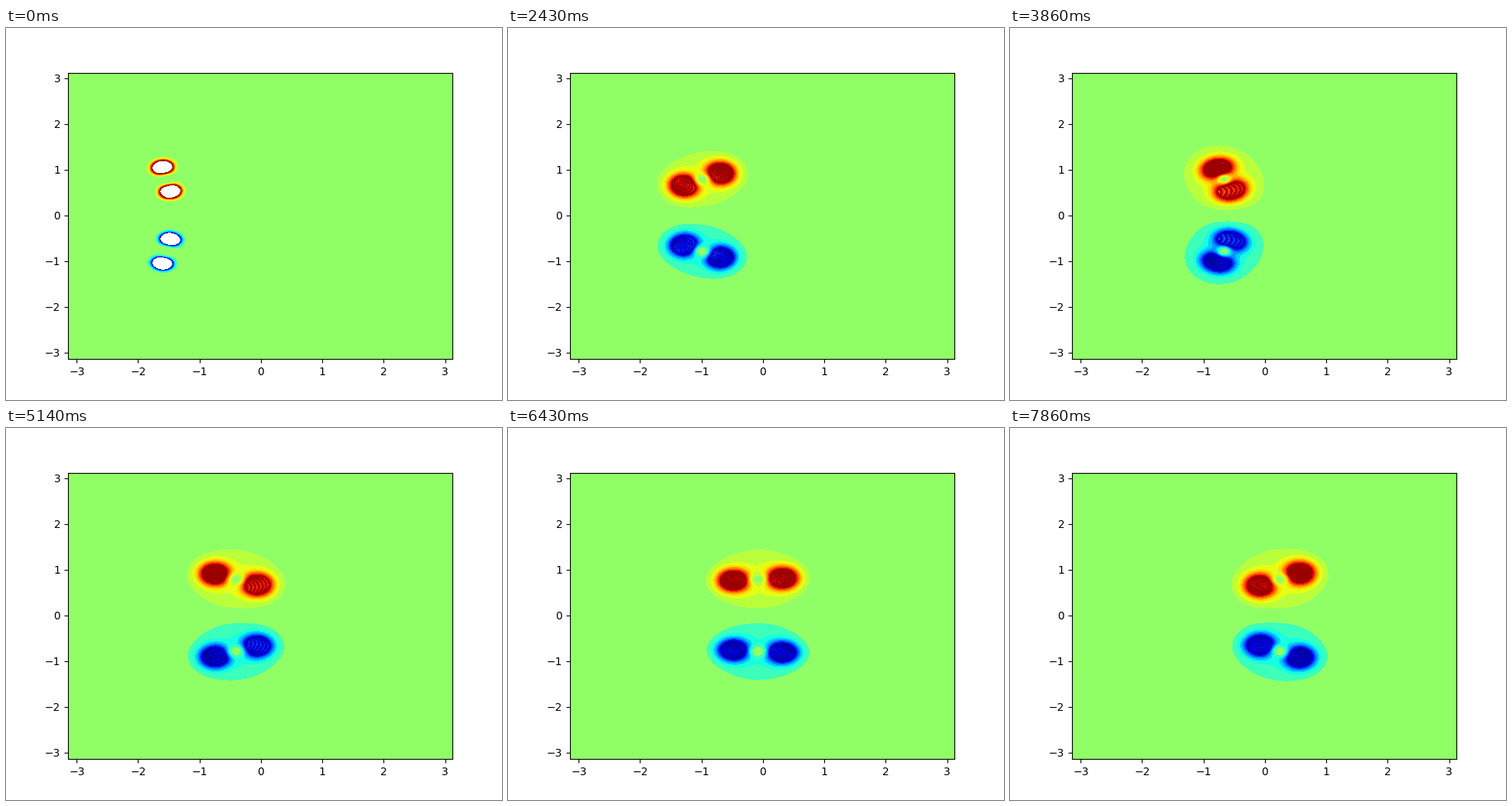
A matplotlib script for the animation above (8000 ms loop, 640 px wide and 480 px high).

```python
import numpy as np
import matplotlib.pyplot as plt
from matplotlib.animation import FuncAnimation

FRAMES, LOOP_MS = 56, 8000
GRID = 256
TRAIL = 30            # older contour layers kept under the newest one
STRENGTH = 0.085      # peak vorticity times squared core radius

# Orbit of one core about the centre of its pair: step, angle, separation.
STEPS = np.array([0, 8, 17, 27, 36, 45, 55])
ANGLES = np.radians([104, 168, 204.5, 295, 345, 363.6, 382.7])
GAPS = np.array([0.535, 0.675, 0.65, 0.51, 0.745, 0.80, 0.70])

# One wide band around zero, narrow bands up to the cut-off on both sides.
LEVELS = np.delete(np.linspace(-1, 1, 21), 10)
COLORS = plt.cm.jet(np.delete(np.linspace(0.025, 0.975, 20), 9))


def smooth(k, values):
    """Cubic Hermite curve through the orbit points."""
    i = min(np.searchsorted(STEPS, k, side="right") - 1, len(STEPS) - 2)
    slope = np.gradient(values, STEPS)
    h = STEPS[i + 1] - STEPS[i]
    t = (k - STEPS[i]) / h
    ease = t * t * (3 - 2 * t)
    return (values[i] * (1 - ease) + values[i + 1] * ease
            + h * t * (1 - t) * (slope[i] * (1 - t) - slope[i + 1] * t))


def grow(k, tau):
    return 1 - np.exp(-k / tau)


def pair(x, y, k):
    """Two like-signed cores circling inside a shared halo."""
    angle, gap = smooth(k, ANGLES), smooth(k, GAPS)
    dx, dy = x - (-1.54 + 0.0324 * k), y - np.pi / 4
    along = dx * np.cos(angle) + dy * np.sin(angle)
    across = dy * np.cos(angle) - dx * np.sin(angle)

    size = 0.0135 + 0.0265 * grow(k, 6) + 0.0001 * k
    squash = np.sqrt(0.7 / gap)
    cores = sum(np.exp(-((along - c)**2 * squash + across**2 / squash) / size)
                for c in (-gap / 2, gap / 2))

    a = 0.5 + 0.25 * grow(k, 8)
    b = 0.24 + 0.4 * grow(k, 10)
    q = (along / a)**2 + (across / b)**2
    halo = 0.19 * grow(k, 3) * np.exp(-0.64 * q**2)

    eye = 1 - np.exp(-(along**2 + across**2) / 0.02)
    return (STRENGTH / size * cores + halo) * eye


fig, ax = plt.subplots(figsize=(6.4, 4.8), dpi=100)
axis = np.linspace(-np.pi, np.pi, GRID, endpoint=False)
X, Y = np.meshgrid(axis, axis)
layers = [ax.contourf(X, Y, pair(X, Y, k) - pair(X, -Y, k), LEVELS, colors=COLORS)
          for k in range(FRAMES)]
ax.set_xlim(axis[0], axis[-1])
ax.set_ylim(axis[0], axis[-1])


def update(k):
    # Values beyond the levels stay unfilled, so older layers show through.
    for j, layer in enumerate(layers):
        layer.set_visible(k - TRAIL < j <= k)
    return layers


anim = FuncAnimation(fig, update, frames=FRAMES, interval=LOOP_MS / FRAMES,
                     repeat=True, repeat_delay=0)
plt.show()
```
